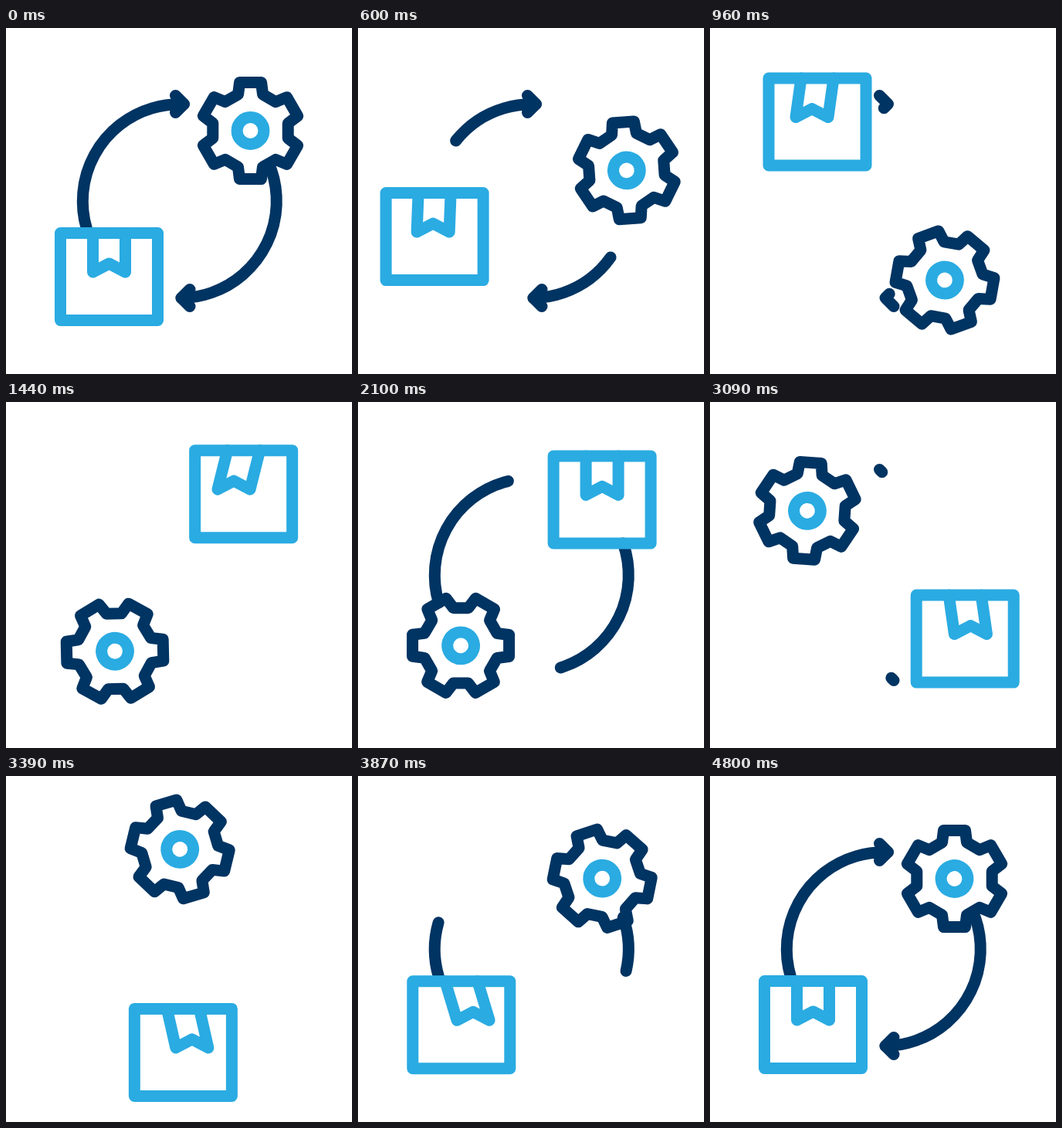
Write an HTML page with a canvas that moves like this. It is 448 px wide and 448 px high and loops after 5.4 s.

```html
<!DOCTYPE html>
<html>
<head>
<meta charset="utf-8">
<style>
  html, body { margin: 0; width: 100%; height: 100%; overflow: hidden; background: #fff; }
  canvas { display: block; width: 448px; height: 448px; }
</style>
</head>
<body>
<canvas id="stage" width="448" height="448"></canvas>
<script>
const ctx = document.getElementById('stage').getContext('2d');
const DARK = '#003462', LIGHT = '#2aabe2';
const LOOP = 5400, ACTIVE = 4800, ARROW_CYCLE = 2035;
const CENTER = { x: 224.8, y: 224.2 };
const RAD = Math.PI / 180;

const progress = (t, from, to) => Math.min(1, Math.max(0, (t - from) / (to - from)));
const ease = (t, from, to) => {
  const x = progress(t, from, to);
  return x * x * (3 - 2 * x);
};

// Gear spin as [ms, degrees], joined by a smooth curve
const SPIN = [[0, 0], [240, 12], [960, 100], [2100, 210], [2790, 267.4],
  [3390, 343.4], [3870, 401.4], [4560, 470], [4800, 480]];

function spinAt(t) {
  const slope = i => {
    const a = SPIN[Math.max(0, i - 1)], b = SPIN[Math.min(SPIN.length - 1, i + 1)];
    return (b[1] - a[1]) / (b[0] - a[0]);
  };
  let i = 0;
  while (i < SPIN.length - 2 && t > SPIN[i + 1][0]) i++;
  const [t0, v0] = SPIN[i], [t1, v1] = SPIN[i + 1];
  const d = t1 - t0, x = (t - t0) / d, y = 1 - x;
  return v0 * y * y * (1 + 2 * x) + v1 * x * x * (1 + 2 * y)
    + d * x * y * (slope(i) * y - slope(i + 1) * x);
}

function polyline(points, closed) {
  const path = new Path2D();
  points.forEach(([x, y]) => path.lineTo(x, y));
  if (closed) path.closePath();
  return path;
}

function stroke(path, color) {
  ctx.strokeStyle = color;
  ctx.stroke(path);
}

// Strokes only the part of a path between two fractions of its length
function strokePart(path, length, from, to) {
  if (to - from < 0.002) return;
  ctx.setLineDash([(to - from) * length, 9999]);
  ctx.lineDashOffset = -from * length;
  stroke(path, DARK);
  ctx.setLineDash([]);
}

function makeArrow(startDeg, endDeg, head) {
  const radius = 125.5, shaft = new Path2D();
  shaft.arc(CENTER.x, CENTER.y, radius, startDeg * RAD, endDeg * RAD);
  return { shaft, shaftLength: radius * (endDeg - startDeg) * RAD, head: polyline(head), headLength: 31.2 };
}

const ARROWS = [
  makeArrow(163.5, 272.5, [[219.5, 109.5], [230.5, 98.5], [219.5, 87.5]]),
  makeArrow(-19.2, 89, [[238, 338.5], [227, 349.5], [238, 360.5]])
];

const gearPoints = [];
for (let i = 0; i < 6; i++) {
  const c = Math.cos(i * 60 * RAD), s = Math.sin(i * 60 * RAD);
  for (const [x, y] of [[-16, -47], [-14, -62.5], [14, -62.5], [16, -47]])
    gearPoints.push([x * c - y * s, x * s + y * c]);
}
const GEAR = polyline(gearPoints, true);
const HUB = new Path2D();
HUB.arc(0, 0, 17.4, 0, 2 * Math.PI);
const BOX = new Path2D();
BOX.rect(-63, -56.5, 126, 113);

function drawArrows(t) {
  const s = t > 2300 ? t - ARROW_CYCLE : t;
  const redraw = s > 1400;
  const shaft = redraw ? [0, ease(s, 1592, 2267)] : [ease(s, 279, 919), 1];
  const head = redraw ? [0, progress(s, 2200, 2300)] : [progress(s, 919, 1080), 1];
  for (const a of ARROWS) {
    strokePart(a.shaft, a.shaftLength, ...shaft);
    strokePart(a.head, a.headLength, ...head);
  }
}

// Moves the drawing origin to an offset turned about the stage centre
function atOrbit(x, y, turn, draw) {
  const c = Math.cos(turn), s = Math.sin(turn);
  ctx.save();
  ctx.translate(CENTER.x + x * c - y * s, CENTER.y + x * s + y * c);
  draw();
  ctx.restore();
}

function render(t) {
  const first = ease(t, 290, 1565), second = ease(t, 2340, 3900);
  const turn = (first + second) * Math.PI;
  const sway = -13 * first * (1 - ease(t, 1565, 2100))
    + 15.3 * second * (1 - ease(t, 3900, 4500));

  ctx.fillStyle = '#fff';
  ctx.fillRect(0, 0, 448, 448);
  ctx.lineWidth = 15;
  ctx.lineCap = ctx.lineJoin = 'round';
  drawArrows(t);

  atOrbit(91.7, -91.2, turn, () => {
    ctx.rotate(spinAt(t) * RAD);
    stroke(GEAR, DARK);
    stroke(HUB, LIGHT);
  });

  atOrbit(-91.3, 97.8, turn, () => {
    stroke(BOX, LIGHT);
    stroke(polyline([[-21, -56.5], [sway - 21, -6], [sway, -17], [sway + 21, -6], [21, -56.5]]), LIGHT);
  });
}

const start = performance.now();
function frame() {
  render(Math.min((performance.now() - start) % LOOP, ACTIVE));
  requestAnimationFrame(frame);
}
frame();
</script>
</body>
</html>
```
